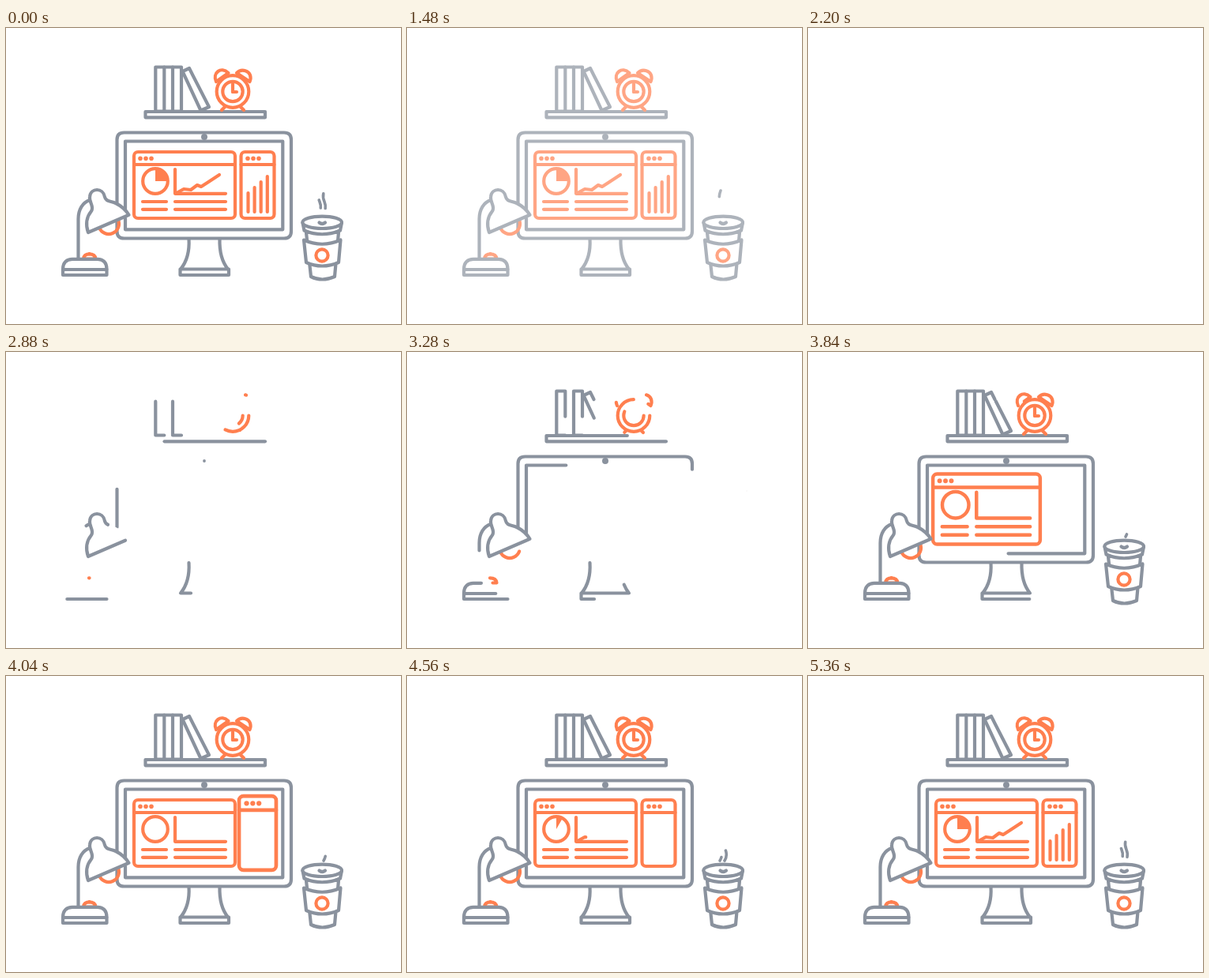
Write an HTML page without scripts that moves like this. It is 500 px wide and 375 px high and loops after 5400 ms.

```html
<!DOCTYPE html>
<html lang="en">
<head>
<meta charset="utf-8">
<title>Desk</title>
<style>
/* --t: shared clock in ms; each part derives its state from it */
@property --t { syntax: "<number>"; inherits: true; initial-value: 5400; }
@keyframes clock { from { --t: 2100; } to { --t: 7500; } }
@keyframes fade {
  0%, 22.96% { opacity: 1; }
  37.78%, 41% { opacity: 0; }
  41.01%, 100% { opacity: 1; }
}
@keyframes drop {
  0%, 38.8% { transform: none; }
  38.81%, 60.74% { transform: translate(30px, -112px) rotate(40deg) scale(0); }
  62.96% { transform: translate(30px, -100px) rotate(30deg) scale(1); }
  65.19% { transform: translate(9.5px, -59px) rotate(12.7deg) scale(1); }
  68.15%, 100% { transform: none; }
}
html, body { margin: 0; width: 100%; height: 100%; overflow: hidden; background: #fff; }
svg {
  display: block; width: 100vw; height: 100vh;
  fill: none; stroke: #8a929e; stroke-width: 4.2;
  stroke-linecap: round; stroke-linejoin: round;
  animation: clock 5.4s linear -3.3s infinite;
}
.all { animation: fade 5.4s linear infinite; }
.hot { stroke: #ff7f4f; }
.dots { fill: #ff7f4f; stroke: none; }
.white { fill: #fff; }

/* line drawing: --s start, --d duration */
.p {
  --d: 960;
  --k: clamp(0, (var(--t) - var(--s)) / var(--d), 1);
  stroke-dasharray: 100px 300px;
  stroke-dashoffset: calc((1 - var(--k)) * 101px);
}
.wedge {
  --k: clamp(0, (var(--t) - 4440) / 360, 1);
  stroke-width: 15; stroke-linecap: butt;
  stroke-dasharray: 25px 300px;
  stroke-dashoffset: calc((1 - var(--k)) * 25px);
}
.pop {
  --up: clamp(0, (var(--t) - var(--s)) / var(--d), 1);
  --back: clamp(0, (var(--t) - var(--s) - var(--d) - 40) / 120, 1);
  transform: scale(calc(1.17 * var(--up) - .17 * var(--back)));
}
.cam {
  fill: #8a929e; stroke: none;
  transform-origin: 251px 138px;
  transform: scale(clamp(0, (var(--t) - 2740) / 300, 1));
}
.cup { transform-origin: 400px 288px; animation: drop 5.4s linear infinite; }
.steam {
  --head: clamp(0, (var(--t) - var(--s)) * .014, 29);
  --tail: clamp(0, (var(--t) - var(--e)) * var(--r), 29);
  stroke-width: 3.6;
  stroke-dasharray: calc((var(--head) - var(--tail)) * 1px) 99px;
  stroke-dashoffset: calc(var(--tail) * -1px);
  opacity: clamp(0, min(var(--t) - var(--s) - 180, (var(--head) - var(--tail)) * 9), 1);
}
</style>
</head>
<body>
<svg viewBox="0 0 500 375">
<g class="all">

  <!-- shelf and books -->
  <path class="p" pathLength="100" style="--s:2490" d="M328 113.3H176.500V106H328Z"/>
  <path class="p" pathLength="100" style="--s:2490" d="M200.300 105.500H189.300V49.500H200.300Z"/>
  <path class="p" pathLength="100" style="--s:2490" d="M222 105.500H211V49.500H222Z"/>
  <path class="p" pathLength="100" style="--s:3540;--d:200" d="M200.300 49.500H211"/>
  <path class="p" pathLength="100" style="--s:3540;--d:200" d="M200.300 105.500H211"/>
  <path class="p" pathLength="100" style="--s:2900" d="M236.500 60L232 51L223.500 55L246.500 104.500L257 100Z"/>

  <!-- alarm clock -->
  <g class="hot">
    <path class="p" pathLength="100" style="--s:3200;--d:800" d="M266 68C261 57 272 48 281.500 57Z"/>
    <path class="p" pathLength="100" style="--s:2850;--d:1000" d="M303 54.300C309 56 311 62 308.500 68L292 57C295 54 299 53 303 54.300"/>
    <path class="p" pathLength="100" style="--s:2860;--d:700" d="M296 99L301 104"/>
    <path class="p" pathLength="100" style="--s:2900;--d:700" d="M278 99L273 104"/>
    <circle class="p white" pathLength="100" style="--s:2560" cx="287" cy="80.500" r="20.300"/>
    <circle class="p" pathLength="100" style="--s:2735" cx="287" cy="80.500" r="12.700"/>
    <path class="p" pathLength="100" style="--s:3380;--d:320" d="M287 71V81"/>
    <path class="p" pathLength="100" style="--s:3500;--d:260" d="M287 81H292"/>
  </g>

  <!-- monitor -->
  <path class="p" pathLength="100" style="--s:2800;--d:1000" d="M140.500 222V141.500Q140.500 132.500 149.500 132.500H352Q361 132.500 361 141.500V257.500Q361 266.500 352 266.500H149.500Q140.500 266.500 140.500 257.500V246"/>
  <path class="p" pathLength="100" style="--s:3054;--d:970" d="M151 232V143.500H350.300V255.300H151V241"/>
  <circle class="cam" cx="251" cy="138" r="4"/>
  <path class="p" pathLength="100" style="--s:2510" d="M231.500 267C232.500 284 228 297 221 305.500H281C274 297 270 284 270.500 267"/>
  <path class="p" pathLength="100" style="--s:2960;--d:1000" d="M220.500 305.500V313H282V305.500"/>

  <!-- main window -->
  <g class="pop hot" style="--s:3560;--d:310;transform-origin:226px 199px">
    <rect class="white" x="162" y="157" width="128" height="84" rx="5"/>
    <path d="M162 173H290M173 220H203M173 229.800H203M214 220H278M214 229.800H278M214 179V209.800H278"/>
    <g class="dots">
      <circle cx="170" cy="165.300" r="2.800"/><circle cx="177" cy="165.300" r="2.800"/><circle cx="184" cy="165.300" r="2.800"/>
    </g>
    <circle cx="189" cy="194" r="15.800"/>
    <circle class="wedge" pathLength="100" cx="189" cy="194" r="7.500" transform="rotate(-90 189 194)"/>
    <path class="p" pathLength="100" style="--s:4460;--d:520" d="M216 209L225 204L234 205L242 199L247 201L254 196.500L270 186"/>
  </g>

  <!-- side window -->
  <g class="pop hot" style="--s:3850;--d:200;transform-origin:318.500px 199px">
    <rect class="white" x="297.500" y="157" width="42" height="84" rx="5"/>
    <path d="M297.500 173H339.500"/>
    <g class="dots">
      <circle cx="306" cy="165.300" r="2.800"/><circle cx="313" cy="165.300" r="2.800"/><circle cx="320" cy="165.300" r="2.800"/>
    </g>
    <path class="p" pathLength="100" style="--s:4560;--d:260" d="M330.800 233V188"/>
    <path class="p" pathLength="100" style="--s:4680;--d:260" d="M322.700 233V195"/>
    <path class="p" pathLength="100" style="--s:4780;--d:260" d="M314.600 233V202"/>
    <path class="p" pathLength="100" style="--s:5000;--d:260" d="M306.500 233V209"/>
  </g>

  <!-- lamp -->
  <path class="p hot" pathLength="100" style="--s:2900;--d:500" d="M118 253A12.500 12.500 0 0 0 142 243"/>
  <path class="p hot" pathLength="100" style="--s:2860" d="M105 286.300Q113 286.300 113.500 292.500H98Q98.500 286.300 106 286.300"/>
  <path class="p" pathLength="100" style="--s:2814;--d:940" d="M106 218C97 221 91.500 230 91.500 242V292"/>
  <path class="p" pathLength="100" style="--s:2900;--d:900" d="M72 305.500C72 297 77 292.800 84 292.800H116C123 292.800 127.500 297 127.500 305.500"/>
  <path class="p" pathLength="100" style="--s:2490" d="M127.500 313H72V306H127.500Z"/>
  <path class="p white" pathLength="100" style="--s:2240;--d:820" d="M151 238.700L104 259C100 247 103 238 108 232C112 226 105 221 106 214C107 202 123 202 125 214C126 220 133 219 139 222C147 226 152 231 155.500 236.800Z"/>

  <!-- coffee -->
  <path class="steam" pathLength="29" style="--s:3600;--e:5120;--r:.021" d="M402 234C405 229 405 225 403 220S400.500 213 403 206"/>
  <path class="steam" pathLength="29" style="--s:4220;--e:4760;--r:.01" d="M396 234C399 229 399 225 397 220S394.500 213 397 206"/>
  <g class="cup">
    <path class="white" d="M380 259L386 315Q400 322 416 315L421 259Z"/>
    <path class="white" d="M377 268.500Q400 279 423.500 268.500L421 297Q400 306 380 297Z"/>
    <path class="white" d="M375.500 246.500L377.500 256.500Q400 266 423 256.500L425 246.500Z"/>
    <ellipse class="white" cx="400.200" cy="246.300" rx="24.800" ry="7.700"/>
    <path d="M396.500 246.500Q400.200 249.500 404 246.500"/>
    <circle class="hot" cx="400" cy="288" r="7.600"/>
  </g>

</g>
</svg>
</body>
</html>
```
